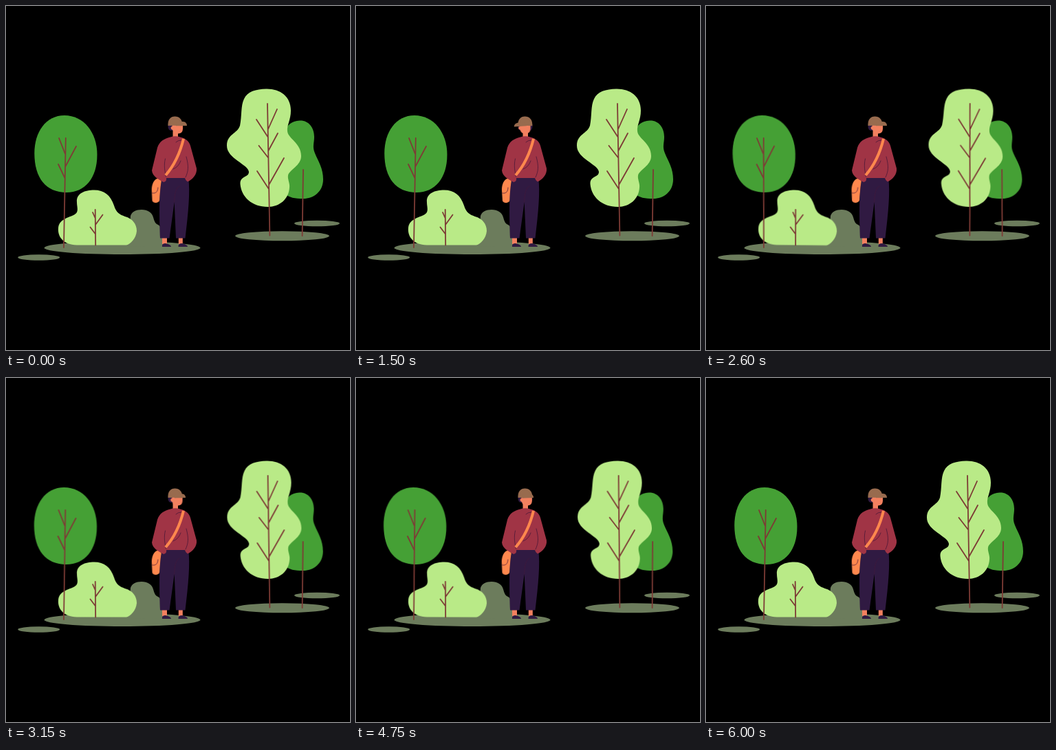
Animation of 500x500 px, one loop 6100 ms. Source, as an HTML page without scripts:

```html
<!DOCTYPE html>
<html lang="en">
<head>
<meta charset="utf-8">
<title>Walk in the park</title>
<style>
html, body { margin: 0; width: 100%; height: 100%; overflow: hidden; background: #000; }
svg { display: block; width: 100%; height: 100%; }

.shade { fill: #6c7c5c; }
.dark { fill: #45a035; }
.light { fill: #b9ea87; }
.wood { fill: none; stroke: #7d3b35; stroke-width: 1.8; stroke-linecap: round; }
.skin { fill: #f3805f; }
.navy { fill: #301a42; }
.red { fill: #a03445; }
.orange { fill: #ff884e; }
.cap { fill: #986b4e; }
.fold { fill: none; stroke: #4a1838; stroke-width: .8; stroke-linecap: round; }

.sway, .face, .brim, .bag {
  animation: 6.1s cubic-bezier(.37, 0, .63, 1) infinite;
}
/* Four swings of 1.5 s, then a short rest */
.sway { animation-name: sway; }
@keyframes sway {
  0%, 24.59%, 49.18%, 73.77%, 98.36%, 100% { transform: rotate(0deg); }
  12.295%, 36.885%, 61.475%, 86.065% { transform: rotate(var(--tilt)); }
}
.oval { --tilt: -2deg; transform-origin: 84px 351px; }
.bush { --tilt: 1deg; transform-origin: 130px 348px; }
.tall { --tilt: 2deg; transform-origin: 383.5px 334px; }
.rear { --tilt: -2deg; transform-origin: 430.5px 334px; }

/* The head looks left and back every 3 s */
.face { animation-name: face; }
@keyframes face {
  0%, 32.79%, 49.18%, 81.97%, 100% { transform: translateX(0); }
  12.295%, 20.49%, 61.475%, 69.67% { transform: translateX(-4.6px); }
}
.brim { animation-name: brim; }
@keyframes brim {
  0%, 32.79%, 49.18%, 81.97%, 100% {
    d: path("M250 168L257 168C261 168 263 171 263 174L247 174.3C247 171 248 168 250 168Z");
  }
  12.295%, 20.49%, 61.475%, 69.67% {
    d: path("M233 170L240 170C242 170 243 172 243 174.3L224 176C224 172 228 170 233 170Z");
  }
}
.bag { animation-name: bag; transform-origin: 223px 252px; }
@keyframes bag {
  0%, 49.18%, 98.36%, 100% { transform: rotate(1deg); }
  16.4%, 65.57% { transform: rotate(-.5deg); }
  38%, 87% { transform: rotate(2deg); }
}
</style>
</head>
<body>
<svg viewBox="0 0 500 500">
  <g class="shade">
    <ellipse cx="169" cy="351.5" rx="113.5" ry="9.5"/>
    <ellipse cx="47.7" cy="365.5" rx="30.5" ry="4.3"/>
    <ellipse cx="401.5" cy="334.2" rx="68.3" ry="7"/>
    <ellipse cx="452" cy="316" rx="33" ry="4.3"/>
    <path d="M178 350L181 305C183 299 189 296 197 296C206 296 212 300 214 307C216 314 217 316 221 318C226 321 228 327 227 349Z"/>
  </g>

  <g class="sway rear">
    <path class="dark" d="M427 166.5C440 166 448 177 448 190C448 200 445 204 449 214C454 226 461 236 461 252C461 270 447 280 432 280C420 280 412 279 404 272L404 185C408 173 415 167 427 166.5Z"/>
    <path class="wood" d="M432 238L430.6 334"/>
  </g>

  <g class="sway tall">
    <path class="light" d="M378 120.5C398 120 414 131 414 152C414 166 408 173 409 182C410 193 429 199 429 218C429 232 412 238 410 246C409 252 413 258 412 264C411 281 397 292 381 292C357 292 342 277 340.5 259C340 246 353 250 353 241C352 230 321 222 321 203C321 186 336 186 340 174C343 160 341 145 346 135C351 124 363 121 378 120.5Z"/>
    <path class="wood" d="M380 142L383.4 333.5M364 165L381 191M394 150L381 179M395 185L381 211M367.5 203L381.5 221M404 221L382 260M365 240L382 266"/>
  </g>

  <g class="sway oval">
    <path class="dark" d="M85 159C113 159 132.5 184 132.5 216C132.5 250 115 271 88 271C58 271 41.3 250 41.3 214C41.3 183 58 159 85 159Z"/>
  </g>
  <g class="sway bush">
    <path class="light" d="M103 347.5C83 347 75 335 76 323C77 310 90 308 98 304C107 300 103 293 103 285C102 272 115 267.5 128 267.5C143 267.5 152 275 157 290C160 300 165 303 173 306C184 309 190 317 190 327C189 338 181 346 175 347.5Z"/>
    <path class="wood" d="M129.7 296L130.2 347.5M126 300L130 309M140.5 303.5L130 318M122.5 321.5L130 331.5"/>
  </g>
  <g class="sway oval">
    <path class="wood" d="M86.8 192L84 351M77 192L86 215M102 204L86 234M76 230L85.5 250"/>
  </g>

  <!-- Walker -->
  <g class="skin">
    <path d="M227 335h7v11h-7zM250.8 335h6v11h-6z"/>
    <path d="M242.5 182h7.5v9h-7.5z"/>
  </g>
  <path class="navy" d="M227 350Q226 345 232 345Q240 347 240 350ZM250.5 350Q250 345 256 345Q264 347 264 350Z"/>
  <g class="bag">
    <path class="orange" d="M221 250.5C215 252 212 259 212 267L213 282C213 287.5 223 287.5 224 282L226 256Q226 251 221 250.5Z"/>
    <path class="fold" d="M213 272C218 273 221 270 221 264"/>
  </g>
  <path class="navy" d="M230 249H265C268 270 265 300 260.5 337.5H247L244.7 285L237.5 337.5H224C223 310 222 275 226 254Z"/>
  <path class="fold" d="M244.7 285C245 272 247 264 252 262" stroke-opacity=".6"/>
  <path class="red" d="M239 190.5Q246 188 253 190.5C260 192 266 196 268 203L277 236C278 245 271 252 264 255.5Q261 254 260 250H233Q234 255 229 256C222 252 213 248 212 239L220 206C223 197 229 193 239 190.5Z"/>
  <path class="fold" d="M231.5 222C229 232 231 240 232.5 248M262 219C266 234 265 240 261 249M247 198Q250 195 255 195M243 237Q251 234 254 225"/>
  <path d="M258 193C253 214 245 231 232 246" fill="none" stroke="#ff884e" stroke-width="4"/>

  <path class="navy" d="M235.6 172H256.4V176Q256 180 253 181H239Q236 180 235.6 176Z"/>
  <path class="face skin" d="M241.5 172H257V179Q256.5 185.5 250 185.5Q243 185.5 242 180Q239.5 179.5 239.5 177Q240 175 241.5 175Z"/>
  <path class="cap" d="M235.5 174C235 165 239 160.5 245.5 160.5C252 160.5 256.3 165 256.3 172V174.3Q246 173.5 235.5 174Z"/>
  <path class="cap brim" d="M250 168L257 168C261 168 263 171 263 174L247 174.3C247 171 248 168 250 168Z"/>
</svg>
</body>
</html>
```
